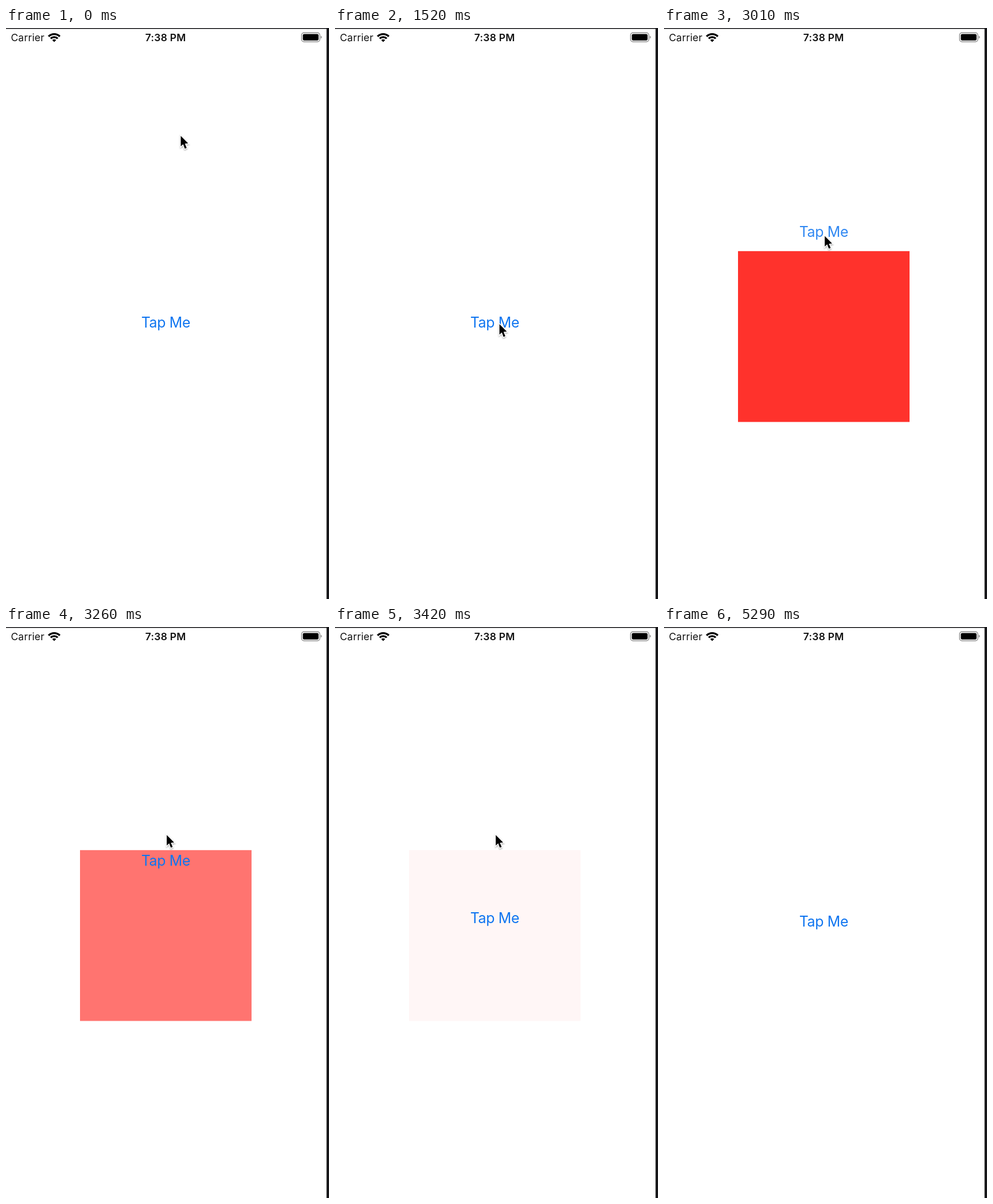
These frames come from a looping animation (563x995 px, 5.32 s). An HTML page:

```html
<!DOCTYPE html>
<html lang="en">
<head>
<meta charset="utf-8">
<title>Tap Me</title>
<style>
  html, body { margin: 0; width: 100%; height: 100%; overflow: hidden; background: #fff; }
  svg { display: block; width: 100vw; height: 100vh; }
  text { font-family: Inter, Roboto, "Liberation Sans", sans-serif; }
</style>
</head>
<body>
<svg viewBox="0 0 563 995" preserveAspectRatio="none">
  <defs>
    <filter id="shadow" x="-50%" y="-50%" width="200%" height="200%">
      <feDropShadow dx="0" dy="1.5" stdDeviation="1.3" flood-color="#000" flood-opacity=".35"/>
    </filter>
  </defs>
  <rect width="563" height="995" fill="#fff"/>
  <rect width="563" height="1.5" fill="#111113"/>
  <rect x="558.7" width="4.3" height="995" fill="#17171a"/>

  <!-- status bar -->
  <text x="8.4" y="23" font-size="17.5" letter-spacing=".2" fill="#111">Carrier</text>
  <g fill="none" stroke="#000" stroke-width="3.4">
    <path d="M74.2 14.7A13.9 13.9 0 0 1 93.8 14.7"/>
    <path d="M77.9 18.4A8.7 8.7 0 0 1 90.1 18.4"/>
    <path d="M84 24.5L80.6 21.1A4.8 4.8 0 0 1 87.4 21.1Z" fill="#000" stroke="none"/>
  </g>
  <text x="278.2" y="23" font-size="17.5" font-weight="600" letter-spacing=".2" text-anchor="middle" fill="#111">7:38 PM</text>
  <rect x="515.2" y="8.2" width="31.8" height="15.8" rx="4.2" fill="none" stroke="#8d8d8d" stroke-width="1.4"/>
  <rect x="517.4" y="10.4" width="27.4" height="11.4" rx="2.4" fill="#000"/>
  <path d="M548.6 13.6Q550.6 14.4 550.6 16.1T548.6 18.6Z" fill="#8d8d8d"/>

  <rect id="box" x="129" y="388.8" width="299" height="297.7" fill="#ff322c"/>
  <text id="label" x="278.4" font-size="25" letter-spacing="-.4" text-anchor="middle" fill="#0f75f0">Tap Me</text>
  <g id="cursor" filter="url(#shadow)">
    <path d="M0 0V18.3L4.2 14.5L7.1 22.2L10.3 20.9L7.2 13.5L12.9 13.1Z" fill="#000" stroke="#fff" stroke-width="2.6" paint-order="stroke"/>
  </g>
</svg>
<script>
  const LOOP = 5320, FADE = 350;
  const LOW = 522.3, HIGH = 363.8;
  const box = document.getElementById('box');
  const label = document.getElementById('label');
  const cursor = document.getElementById('cursor');

  const clamp = x => Math.min(1, Math.max(0, x));
  const span = (t, a, b) => clamp((t - a) / (b - a));
  const mix = (a, b, k) => a + (b - a) * k;
  const smooth = k => k * k * (3 - 2 * k);
  const easeOut = k => 1 - (1 - k) ** 2;

  // cubic-bezier(.42, 0, .58, 1)
  function easeInOut(x) {
    let lo = 0, hi = 1;
    for (let i = 0; i < 24; i++) {
      const s = (lo + hi) / 2, r = 1 - s;
      if (3 * s * r * r * .42 + 3 * s * s * r * .58 + s ** 3 < x) lo = s; else hi = s;
    }
    return smooth(lo);
  }

  // Cursor strokes: start, end, from, bend, to, easing
  const moves = [
    [30, 565, [304.6, 188], [450, 330], [290, 494], smooth],
    [565, 900, [290, 494], [287, 505], [286.6, 516], easeOut],
    [2400, 2860, [286.6, 516], [288, 430], [280.2, 362.4], smooth],
    [3740, 4010, [280.2, 362.4], [320, 335], [374, 279], smooth]
  ];

  function cursorAt(t) {
    const [a, b, p, c, q, ease] = moves.findLast(m => t >= m[0]) || moves[0];
    const k = ease(span(t, a, b));
    return [0, 1].map(i => mix(mix(p[i], c[i], k), mix(c[i], q[i], k), k));
  }

  const pressed = t => (t >= 1460 && t < 1515) || (t >= 2960 && t < 3060);

  function draw(t) {
    const shown = easeInOut(span(t, 1610, 1610 + FADE)) - easeInOut(span(t, 3122, 3122 + FADE));
    box.setAttribute('opacity', shown);
    label.setAttribute('y', mix(LOW, HIGH, shown));
    label.setAttribute('opacity', pressed(t) ? .86 : 1);
    cursor.setAttribute('transform', `translate(${cursorAt(t).join(' ')})`);
    cursor.setAttribute('visibility', t < 4010 ? 'visible' : 'hidden');
  }

  const start = performance.now();
  function tick() {
    draw((performance.now() - start) % LOOP);
    requestAnimationFrame(tick);
  }
  tick();
</script>
</body>
</html>
```
